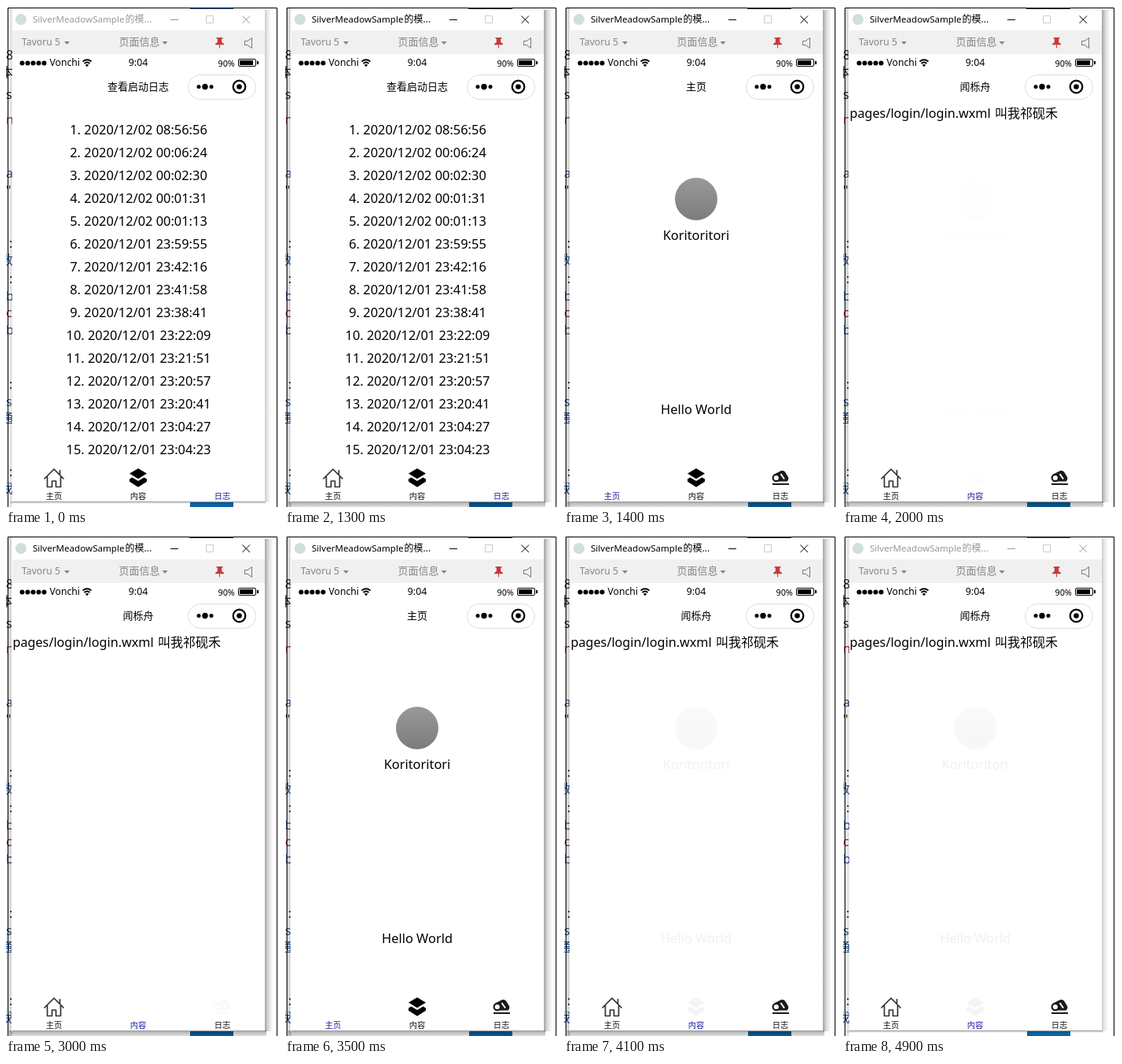
Write an HTML page that moves like this. It is 347 px wide and 636 px high and loops after 5 s.

```html
<!DOCTYPE html>
<html lang="zh-CN">
<head>
<meta charset="utf-8">
<style>
html, body { margin: 0; width: 100%; height: 100%; overflow: hidden; background: #fff; }
svg { display: block; width: 347px; height: 636px; }
text { font-family: "Noto Sans", "Open Sans", "Noto Sans CJK SC", "Noto Sans CJK", sans-serif; white-space: pre; }
.mid { text-anchor: middle; }
.line { fill: none; stroke: #333; }
</style>
</head>
<body>
<svg viewBox="0 0 347 636" xmlns="http://www.w3.org/2000/svg">
  <defs>
    <linearGradient id="fadeR"><stop offset="0" stop-color="#000" stop-opacity=".36"/><stop offset=".45" stop-color="#000" stop-opacity=".13"/><stop offset="1" stop-color="#000" stop-opacity="0"/></linearGradient>
    <linearGradient id="fadeB" x2="0" y2="1"><stop offset="0" stop-color="#000" stop-opacity=".34"/><stop offset="1" stop-color="#000" stop-opacity=".12"/></linearGradient>
    <linearGradient id="face" x2="0" y2="1"><stop offset="0" stop-color="#999"/><stop offset="1" stop-color="#7c7c7c"/></linearGradient>
    <clipPath id="edge"><path d="M0 0H9V636H0Z"/></clipPath>
  </defs>

  <!-- desktop behind the window -->
  <path fill="#fff" d="M0 0H347V636H0Z"/>
  <path fill="#0864a4" d="M234 2h55v3h-55zM234 628h55v8h-55z"/>
  <g id="code" clip-path="url(#edge)" font-size="16"></g>
  <path class="line" style="stroke:#000" d="M2.5 636V2.5H344.5V636"/>
  <g id="shade">
    <path fill="#000" opacity=".16" d="M3 3H8V636H3Z"/>
    <path fill="url(#fadeR)" d="M329 5h11v625h-11z"/>
    <path fill="url(#fadeB)" d="M4 629h327v7H4z"/>
    <path fill="#222" d="M233 2h56v2h-56z"/>
  </g>
  <g id="softShade">
    <path fill="#000" opacity=".1" d="M3 3H8V636H3Z"/>
    <path fill="url(#fadeR)" opacity=".55" d="M329 5h9v625h-9z"/>
    <path fill="url(#fadeB)" opacity=".5" d="M5 629h325v3H5z"/>
  </g>

  <!-- window -->
  <path id="win" fill="#fff" d="M8 4H329V630H8Z"/>
  <path id="rim" class="line" d="M8 629.5H329" style="stroke:#999"/>
  <circle cx="19" cy="17" r="7" fill="#cfe0d6"/>
  <g id="caption">
    <text x="34" y="21" font-size="11.6">SilverMeadowSample</text>
    <text x="151.5" y="21" font-size="12">的模...</text>
  </g>
  <path id="ctrl" fill="none" d="M209 17.5h10M300.500 12.500l9.500 9.500m0 -9.500l-9.500 9.500"/>
  <path fill="none" stroke="#ccc" d="M254.500 12.500h9v9h-9z"/>

  <!-- simulator toolbar -->
  <path fill="#f0f0f0" d="M8 31H329V61H8Z"/>
  <g fill="#858585">
    <text x="20" y="50" font-size="12.2">Tavoru 5</text>
    <text x="143.500" y="50" font-size="13">页面信息</text>
    <path d="M74 45h7l-3.500 4zM198.500 45h7l-3.500 4z"/>
  </g>
  <path fill="#c8393b" d="M267.500 40h8v1.500h-1.300v4.500l2.800 2v1.300h-5v4.200h-1v-4.200h-5v-1.300l2.800 -2v-4.500h-1.300z"/>
  <path class="line" style="stroke:#777" d="M303.500 44.500h3.500l5.500 -4v13l-5.500 -4h-3.500z"/>

  <!-- status bar -->
  <g id="signal"></g>
  <text x="55.500" y="76" font-size="12.2">Vonchi</text>
  <g fill="none" stroke="#000" stroke-width="1.700">
    <path d="M97.500 70.500q5.500 -4.500 11 0M99.500 73q3.500 -3 7 0"/>
  </g>
  <path d="M100.800 74.800q2.200 -1.800 4.400 0l-2.200 2.400z"/>
  <text class="mid" x="168" y="76.300" font-size="12.300">9:04</text>
  <text x="269.500" y="76.500" font-size="10.800">90%</text>
  <rect x="295.500" y="67.500" width="22" height="9" rx="1.500" fill="none" stroke="#000"/>
  <path d="M297 69h17v6h-17zM319 70h2v4h-2z"/>

  <!-- navigation bar -->
  <text id="title" class="mid" x="168" y="107" font-size="13"></text>
  <rect x="231.500" y="87.500" width="86" height="31" rx="15.500" fill="#fff" stroke="#ddd"/>
  <circle cx="245" cy="102.500" r="2.500"/><circle cx="253" cy="102.500" r="3.700"/><circle cx="261" cy="102.500" r="2.500"/>
  <circle cx="296.500" cy="102.500" r="7.800" fill="none" stroke="#000" stroke-width="2.300"/>
  <circle cx="296.500" cy="102.500" r="3.300"/>

  <!-- pages -->
  <g id="page0" font-size="16.400">
    <circle cx="168" cy="245" r="27" fill="url(#face)"/>
    <text class="mid" x="168" y="297">Koritoritori</text>
    <text class="mid" x="168" y="518">Hello World</text>
  </g>
  <g id="page1">
    <text x="8.500" y="142" font-size="16.200">pages/login/login.wxml</text>
    <text x="193" y="142" font-size="16">叫我祁砚禾</text>
  </g>
  <g id="page2" class="mid" font-size="16.400"></g>

  <!-- tab bar -->
  <g id="icon0" class="line" stroke-width="1.700" stroke-linejoin="round" stroke-linecap="round">
    <path d="M49 600L61 588L73 600M52.500 597.500V610.500H58.500V603H63.500V610.500H69.500V597.500M68.500 594V589.500"/>
  </g>
  <g id="icon1">
    <path d="M168 587l11 6.500l-11 6.700l-11 -6.700z"/>
    <path d="M157 600.500l3.500 -2l7.500 4.500l7.500 -4.500l3.500 2v3.300l-11 7l-11 -7z"/>
  </g>
  <g id="icon2">
    <path fill="#1a1a1a" d="M267 594.500L276 590q3 -1 5 1.500L285 598q1 3 -1.500 5.500H270z"/>
    <circle cx="269.800" cy="599" r="4.200" fill="#fff" stroke="#1a1a1a" stroke-width="2.200"/>
    <path fill="none" stroke="#fff" stroke-width="2" d="M275.500 594l4.500 6.500"/>
    <path fill="none" stroke="#1a1a1a" stroke-width="2" d="M265 607h21"/>
  </g>
  <g class="mid" font-size="10.300">
    <text id="tab0" x="61" y="626">主页</text>
    <text id="tab1" x="168" y="626">内容</text>
    <text id="tab2" x="275" y="626">日志</text>
  </g>
</svg>
<script>
const $ = id => document.getElementById(id);
const NS = "http://www.w3.org/2000/svg";

function add(parent, tag, attrs, text = "") {
  const el = document.createElementNS(NS, tag);
  for (const k in attrs) el.setAttribute(k, attrs[k]);
  el.textContent = text;
  parent.append(el);
}

for (let i = 0; i < 5; i++) add($("signal"), "circle", { cx: 20.5 + i * 7, cy: 72.5, r: 3 });

// code peeking out beside the window: glyph, baseline, colour
const INK = { k: "#222", r: "#a02828", b: "#28508c" };
for (const [s, y, c] of [["8", 68, "k"], ["本", 90, "k"], ["s", 118, "k"], ["n", 150, "r"],
  ["a", 218, "b"], ["\"", 240, "k"], [":", 307, "k"], ["数", 328, "b"], [":", 352, "k"],
  ["b", 374, "b"], ["c", 395, "r"], ["b", 417, "b"], [":", 486, "k"], ["s", 508, "b"],
  ["通", 529, "b"], [":", 597, "k"], ["我", 618, "b"]])
  add($("code"), "text", { x: s > "~" ? -7 : s === ":" ? 4 : 0, y, fill: INK[c] }, s);

const LOGS = ["08:56:56", "00:06:24", "00:02:30", "00:01:31", "00:01:13",
  "23:59:55", "23:42:16", "23:41:58", "23:38:41", "23:22:09",
  "23:21:51", "23:20:57", "23:20:41", "23:04:27", "23:04:23"];
LOGS.forEach((clock, i) => add($("page2"), "text", { x: 168.5, y: 163 + i * 29 },
  `${i + 1}. 2020/12/0${i < 5 ? 2 : 1} ${clock}`));

const HOME = 0, INFO = 1, LOG = 2;
const TITLES = ["主页", "闻栎舟", "查看启动日志"];

// start, page, tab whose icon is still missing, faint leftover page and its strength
const STEPS = [
  { at: 0, page: LOG },
  { at: 1400, page: HOME },
  { at: 1900, page: INFO, late: HOME },
  { at: 2000, page: INFO, rest: HOME, dim: .006 },
  { at: 2400, page: LOG, rest: INFO, dim: .025 },
  { at: 3000, page: INFO, late: LOG },
  { at: 3100, page: INFO },
  { at: 3500, page: HOME },
  { at: 4100, page: INFO, rest: HOME, dim: .055 }
];

function draw(t) {
  const { page, late, rest, dim = 0 } = STEPS.filter(s => s.at <= t).pop();
  const active = t >= 1300 && t < 4900;

  for (let i = 0; i < 3; i++) {
    $("page" + i).setAttribute("opacity", i === page ? 1 : i === rest ? dim : 0);
    $("icon" + i).setAttribute("opacity", i === page ? dim * .7 : i === late ? .015 : 1);
    $("tab" + i).setAttribute("fill", i === page ? "#1a1aa6" : "#111");
  }
  $("title").textContent = TITLES[page];

  $("shade").setAttribute("opacity", active ? 1 : 0);
  $("softShade").setAttribute("opacity", active ? 0 : 1);
  $("win").setAttribute("d", `M${active ? 7 : 8} 4H329V630H${active ? 7 : 8}Z`);
  $("caption").setAttribute("fill", active ? "#000" : "#999");
  $("ctrl").setAttribute("stroke", active ? "#000" : "#999");
}

let start;
function tick(now) {
  start ??= now;
  draw((now - start) % 5000);
  requestAnimationFrame(tick);
}
draw(0);
requestAnimationFrame(tick);
</script>
</body>
</html>
```
